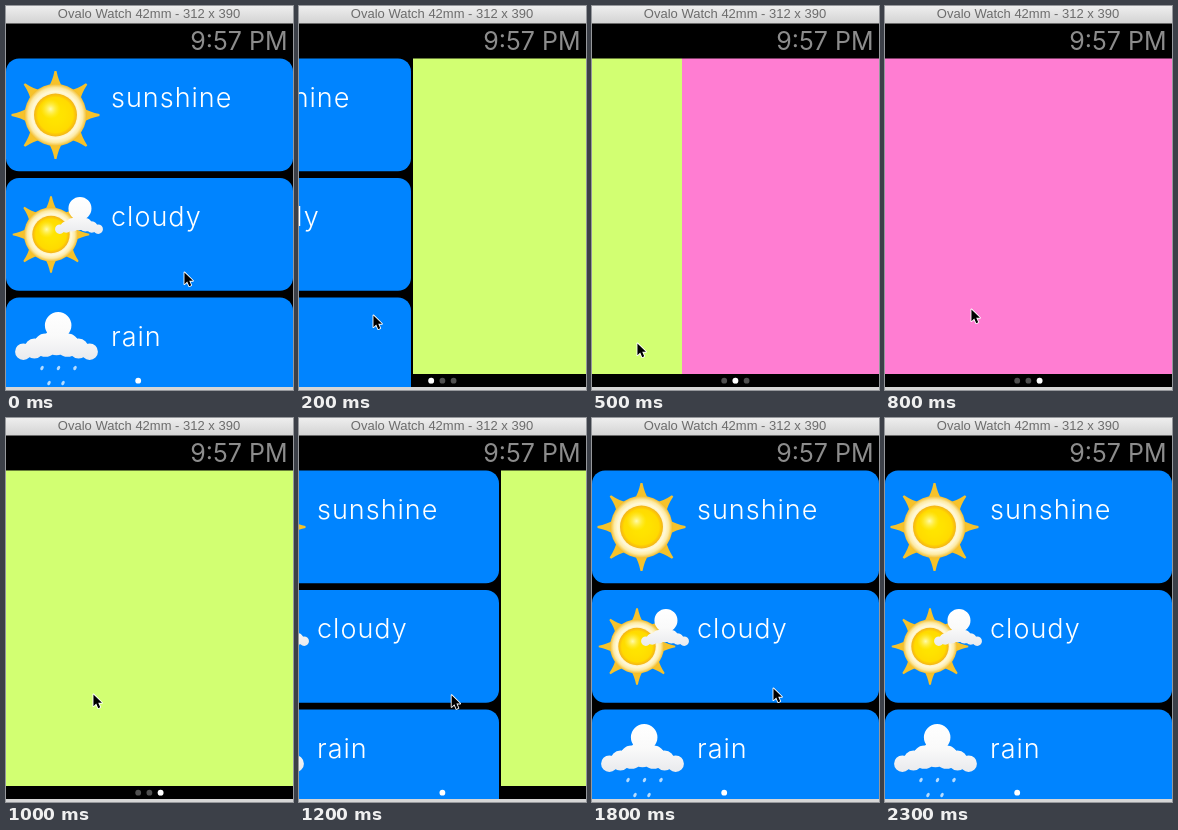
An HTML page with a canvas for the animation above (2400 ms loop, 287 by 384 pixels).

```html
<!DOCTYPE html>
<html lang="en">
<head>
<meta charset="utf-8">
<title>Watch pages</title>
<style>
html, body { margin: 0; width: 100%; height: 100%; overflow: hidden; background: #000; }
canvas { display: block; width: 287px; height: 384px; }
</style>
</head>
<body>
<canvas id="stage" width="287" height="384"></canvas>
<script>
const ctx = document.getElementById('stage').getContext('2d');
const W = 287, H = 384, LOOP = 2400, STEP = 100, PITCH = 289;
const TOP = 52.5, CARD_PITCH = 119.5, PAGE_END = 368, SCREEN_END = 381;
const DOT_LAG = 200, POINTER_END = 2300;

// Page swipes: start, duration, direction
const swipes = [[0, 350, 1], [280, 350, 1], [800, 200, -1], [1000, 315, -1]];

// Pointer stops: time, x, y
const stops = [[0, 178, 266], [200, 74, 309], [500, 45, 337], [800, 86, 303], [1000, 87, 276],
  [1300, 175, 277], [1800, 181, 270], [2000, 66, 333], [2200, 14, 101]];

function ease(u) {
  u = Math.min(1, Math.max(0, u));
  return u * u * (3 - 2 * u);
}

function pageAt(t) {
  return swipes.reduce((sum, [start, time, dir]) => sum + dir * ease((t - start) / time), 0);
}

function pointerAt(t) {
  let [, x, y] = stops[0];
  for (let i = 1; i < stops.length; i++) {
    const [t0, x0, y0] = stops[i - 1], [t1, x1, y1] = stops[i];
    const k = ease((t - t0) / (t1 - t0));
    x += (x1 - x0) * k;
    y += (y1 - y0) * k;
  }
  return [x, y];
}

function rect(x, y, w, h, color) {
  ctx.fillStyle = color;
  ctx.fillRect(x, y, w, h);
}

function disc(x, y, r, color) {
  ctx.beginPath();
  ctx.arc(x, y, r, 0, 7);
  ctx.fillStyle = color;
  ctx.fill();
}

function text(str, x, y, font, color, align = 'left', spacing = 0) {
  ctx.font = font;
  ctx.fillStyle = color;
  ctx.textAlign = align;
  ctx.letterSpacing = spacing + 'px';
  ctx.fillText(str, x, y);
}

function shade(g, ...colors) {
  colors.forEach((c, i) => g.addColorStop(i / (colors.length - 1), c));
  return g;
}

const vertical = (y0, y1, ...colors) => shade(ctx.createLinearGradient(0, y0, 0, y1), ...colors);
const radial = (x, y, r0, r1, ...colors) => shade(ctx.createRadialGradient(x, y, r0, x, y, r1), ...colors);

function sun(x, y, scale) {
  ctx.save();
  ctx.translate(x, y);
  ctx.scale(scale, scale);
  for (let i = 0; i < 8; i++) {
    ctx.beginPath();
    ctx.moveTo(-7, -28);
    ctx.quadraticCurveTo(-3, -34, -1, -44);
    ctx.lineTo(1, -44);
    ctx.quadraticCurveTo(3, -34, 7, -28);
    ctx.fillStyle = '#f6c22a';
    ctx.fill();
    ctx.rotate(Math.PI / 4);
  }
  disc(0, 0, 31, radial(0, 0, 20, 31, '#fff3b8', '#fff8d8', '#fdeaa4', '#f3bd2c'));
  disc(0, 0, 21.5, radial(0, 0, 15, 21.5, '#ffdc00', '#ffd200', '#f3b31c'));
  disc(0, 0, 18, radial(0, 0, 0, 18, '#ffe600', '#ffe200', '#ffda00'));
  disc(-5, -6, 10, radial(-5, -6, 0, 10, '#fffbb0', 'rgba(255,240,60,0)'));
  ctx.restore();
}

// A row of puffs that rises to a round crown
function cloud(x, y, w, h, crown) {
  const mid = x + w * 0.52, r = w * crown;
  ctx.beginPath();
  ctx.arc(mid, y + r, r, 0, 7);
  for (let i = -3; i <= 3; i++) {
    const rise = 1 - Math.abs(i) / 3, pr = w * (0.1 + 0.06 * rise);
    const px = x + w / 2 + i * w * 0.133, py = y + h - pr - h * 0.1 * rise;
    ctx.moveTo(px + pr, py);
    ctx.arc(px, py, pr, 0, 7);
  }
  ctx.fillStyle = vertical(y, y + h, '#ffffff', '#fafafa', '#e9eaed');
  ctx.fill();
}

function drops(x, y, count, gap) {
  for (let i = 0; i < count; i++) {
    ctx.beginPath();
    ctx.ellipse(x + i * gap, y, 1.5, 2.4, 0.5, 0, 7);
    ctx.fillStyle = '#b5dcff';
    ctx.fill();
  }
}

function card(label, i) {
  const y = TOP + i * CARD_PITCH;
  ctx.beginPath();
  ctx.roundRect(0, y, W, 112.7, 13);
  ctx.fillStyle = '#0084ff';
  ctx.fill();
  text(label, 105, y + 48, '300 27px Inter, Roboto, sans-serif', '#fff', 'left', 1);
}

function list() {
  rect(0, 52, PITCH, SCREEN_END - 52, '#000');
  ['sunshine', 'cloudy', 'rain'].forEach(card);
  sun(49.5, 109, 1);
  sun(45, 228.5, 0.87);
  cloud(49, 191, 48, 37, 0.24);
  cloud(9, 306, 83, 48, 0.16);
  drops(36, 362, 3, 16.5);
  drops(43, 377, 2, 14);
}

function arrow(x, y) {
  ctx.save();
  ctx.translate(x, y);
  ctx.scale(0.87, 0.87);
  ctx.beginPath();
  [[0.5, 0.5], [0.5, 14], [3.7, 11], [6, 16.3], [8.3, 15.3], [6, 10.2], [10.3, 10.2]]
    .forEach(p => ctx.lineTo(...p));
  ctx.closePath();
  ctx.lineJoin = 'round';
  ctx.lineWidth = 2;
  ctx.strokeStyle = '#fff';
  ctx.stroke();
  ctx.fillStyle = '#000';
  ctx.fill();
  ctx.restore();
}

function frame() {
  rect(0, 0, W, H, '#000');
  rect(0, 0, W, 17.5, vertical(0, 17.5, '#eeeeee', '#d3d3d3'));
  text('Ovalo Watch 42mm - 312 x 390', 143, 12, '13px "Liberation Sans", Arial, sans-serif', '#6c6c6c', 'center');
  text('9:57 PM', 281.5, 44, '25px Inter, Roboto, sans-serif', '#8c8c8c', 'right');
}

function dot(i, color) {
  disc(132.2 + i * 11.2, 374.7, 2.9, color);
}

function draw(t) {
  frame();
  for (let i = 0; i < 3; i++) dot(i, '#505050');

  ctx.save();
  ctx.translate(-Math.round(pageAt(t) * PITCH), 0);
  list();
  rect(PITCH, TOP, PITCH, PAGE_END - TOP, '#d2ff72');
  rect(PITCH * 2, TOP, PITCH, PAGE_END - TOP, '#ff7dd2');
  ctx.restore();

  dot(Math.round(pageAt(t - DOT_LAG)), '#fff');
  rect(0, SCREEN_END, W, H - SCREEN_END, '#d6d6d6');
  if (t < POINTER_END) arrow(...pointerAt(t));
}

function tick() {
  const t = performance.now() % LOOP;
  draw(Math.floor(t / STEP) * STEP);
  requestAnimationFrame(tick);
}
tick();
</script>
</body>
</html>
```
